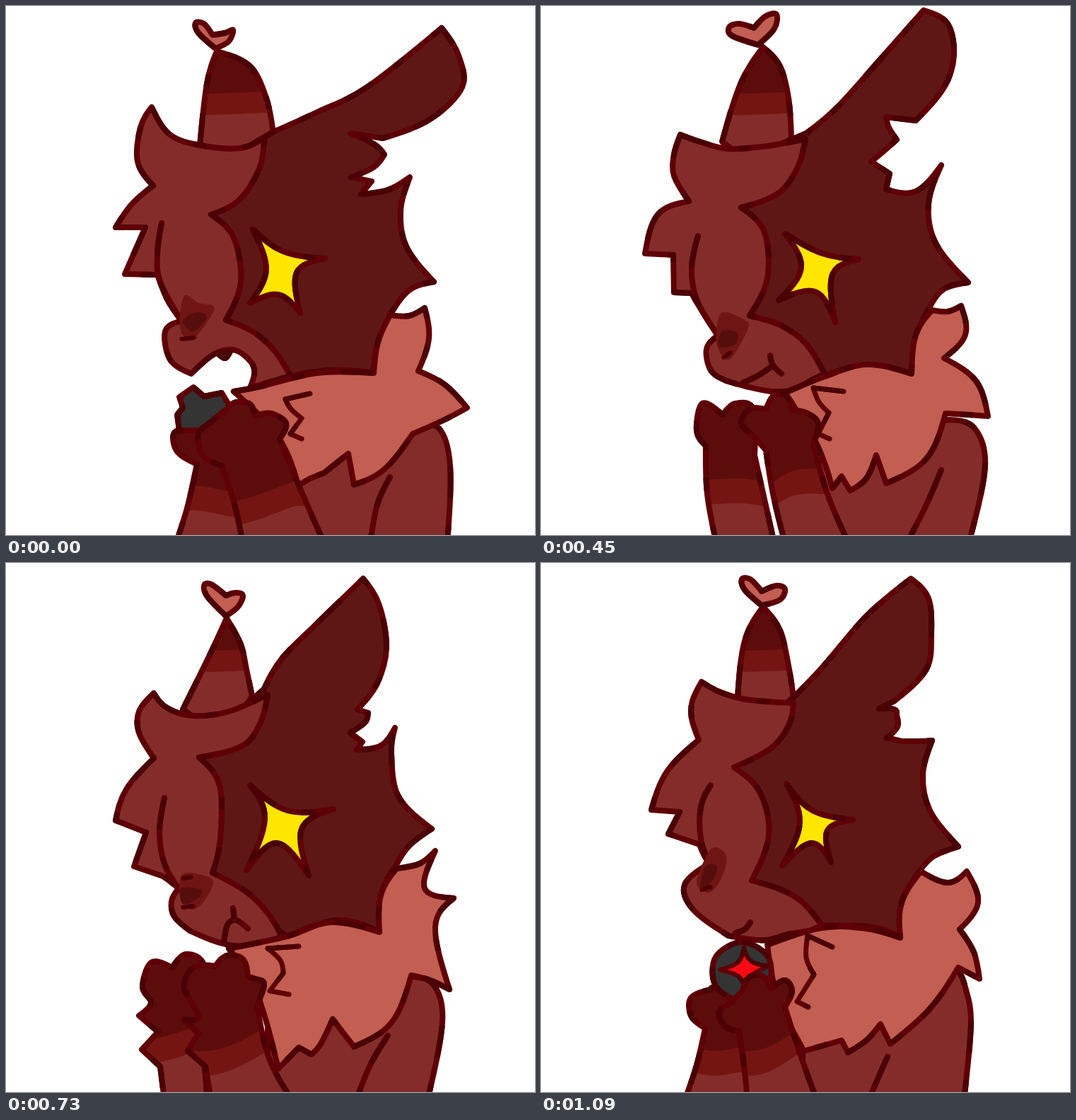
Recreate the animation shown at these times as an HTML page with a canvas. Size 748 by 748 pixels, loop 1.45 s.

```html
<!DOCTYPE html>
<html>
<head>
<meta charset="utf-8">
<style>
html, body { margin: 0; width: 100%; height: 100%; overflow: hidden; background: #fff }
canvas { display: block }
</style>
</head>
<body>
<canvas id="stage" width="748" height="748"></canvas>
<script>
const ctx = document.getElementById('stage').getContext('2d');
const SKIN = '#842C29', DARK = '#5C0D0B', MID = '#751512', FUR = '#C25E52', GREY = '#343434';
const LINE = '#5E0006', LINE_DARK = '#4A0004';
const LOOP = 1450;

// Start time of each drawing and the key pose it shows; halves lie between two poses.
const steps = [[0, 0], [180, .5], [270, 1], [360, 1.5], [450, 2], [550, 3], [640, 3.5],
  [730, 4], [820, 4.5], [910, 5], [1000, 5.5], [1090, 6]];

// One line per key pose, "x,y" points, "!" marks a sharp corner, "|" splits strokes, "-" is empty.
const parse = text => text.trim().split('\n').map(row => row.trim() === '-' ? [] :
  row.split('|').map(part => part.trim().split(/\s+/).map(p => {
    const [x, y] = p.split(',').map(parseFloat);
    return { x, y, sharp: p.endsWith('!') };
  })));

const layers = [];
const add = (style, text) => layers.push({ width: 8, ...style, poses: parse(text) });

// body
add({ fill: SKIN }, `
370,650! 575,595! 612,597 628,650 624,760! 370,760!
370,650! 575,590! 612,597 630,650 600,760! 370,760!
370,650! 575,585! 613,597 628,650 605,760! 370,760!
370,650! 575,588! 610,592 628,650 614,760! 370,760!
370,650! 575,585! 606,598 617,650 596,760! 370,760!
370,650! 578,582! 590,590 603,650 600,760! 370,760!
370,650! 590,575! 600,600 608,650 598,760! 370,760!`);
add({ open: true }, `
543,666! 525,705 515,760
528,672! 507,710 490,760
566,656! 545,705 517,760
553,660! 535,710 520,760
540,668! 515,710 495,760
505,700! 485,725 465,760
490,698! 478,725 463,760`);

// horn and heart
add({ fill: DARK, bands: parse('200,126 320,123 400,119'), drop: 30 }, `
274,198! 284,110 298,64! 345,85 368,130 378,180! 320,240!
267,195! 290,120 317,56! 340,85 352,130 355,186! 320,240!
256,192! 282,110 314,58! 338,85 350,130 354,186! 320,240!
265,192! 292,110 324,70! 340,90 345,130 347,190! 310,240!
250,207! 288,130 312,78! 332,115 340,150 348,188! 310,250!
260,200! 282,120 303,74! 328,105 342,150 343,190! 310,250!
278,190! 288,110 314,62! 338,95 350,145 357,190! 310,240!`);
add({ fill: FUR }, `
296,60! 272,38 268,24 280,25 292,41! 310,38 321,34 315,50
318,55! 275,46 265,36 280,32 310,35! 328,22 338,17 337,32
307,55! 270,42 266,30 280,25 301,31! 318,14 333,12 330,32
322,68! 304,42 304,25 314,28 330,50! 350,44 362,47 350,64
311,75! 285,48 280,32 290,30 311,46! 325,42 335,46 328,62
300,72! 270,55 265,43 280,40 298,50! 315,42 326,45 318,62
312,60! 288,38 284,23 296,23 312,40! 333,32 345,37 338,52`);

// dark side of the head with the ear
add({ fill: '#5E1715' }, `
340,200! 378,178! 440,150 510,115 616,31! 640,70 645,115 600,160 533,187! 487,180! 520,195 535,210! 520,228 488,242! 517,248! 502,266! 540,260 571,242! 558,290 566,340 605,390! 570,402 543,437! 525,480 520,518! 460,515 402,523! 300,450! 270,290!
340,195! 360,183! 420,150 490,90 581,15! 612,60 608,115 575,165 535,187! 478,186! 505,197 510,215! 500,232 483,237! 506,252! 497,264! 535,250 575,236! 555,290 560,335 599,385! 568,400 548,428! 527,470 522,515! 465,508 401,524! 300,450! 265,285!
340,195! 375,180! 420,142 480,75 541,6! 575,25 584,70 570,115 530,162! 488,157! 492,172 503,189! 485,205 467,220! 493,237! 488,259! 530,262 566,225! 548,280 558,335 604,391! 570,400 550,425! 532,465 524,520! 465,507 401,522! 295,450! 270,285!
340,195! 370,180! 400,140 455,70 515,4! 540,25 551,70 535,130 505,165! 472,171! 484,178 486,190! 470,215 450,229! 480,243! 492,265! 535,258 568,226! 555,270 562,330 600,382! 570,400 550,430! 535,465 524,518! 465,505 390,518! 292,455! 268,278!
340,200! 365,178! 390,135 440,85 505,22! 528,60 538,120 525,170 497,207! 512,212! 510,222 505,228! 495,235 487,240! 504,253! 496,264! 530,258 550,233! 545,270 555,330 602,376! 570,400 550,430! 530,470 528,522! 470,505 397,528! 290,450! 265,277!
340,200! 352,188! 395,155 450,95 547,9! 558,50 552,120 548,175 515,205! 482,208! 500,212 505,220! 500,235 478,240! 500,255! 503,255! 525,256 547,248! 535,290 545,335 590,383! 560,410 550,435! 530,475 530,520! 470,512 392,520! 290,447! 262,293!
340,205! 362,185! 400,145 460,75 523,22! 548,50 552,100 545,150 500,195! 478,206! 500,207 503,215! 504,232 489,247! 510,252! 515,252! 535,252 553,251! 540,300 550,350 590,401! 555,415 535,436! 510,480 508,530! 470,515 397,512! 292,452! 262,288!`);

// hair and face
add({ fill: SKIN }, `
206,143! 232,182 275,197 330,201 365,186! 358,230 330,274 290,295! 322,328 332,390 311,444! 350,461 380,488 402,523! 345,540! 350,510 325,487 295,492 262,520! 232,500 225,460 248,445! 228,415 214,380! 168,379! 197,313! 155,313! 178,280 208,254! 186,220 190,172
184,182! 215,190 262,196 320,195 374,188! 362,230 330,268 277,281! 312,315 320,380 304,440! 345,449 380,478 401,522! 365,534! 340,530 315,540 290,545 265,540! 245,520 237,492 248,475! 234,440 221,395! 177,401! 181,356! 146,351! 160,305 196,267! 178,235 178,205
197,182! 225,192 265,202 320,198 374,188! 362,230 335,265 283,285! 316,320 320,385 295,438! 340,452 375,478 401,520! 380,530! 355,543 325,545 290,538 262,530! 240,515 234,485 250,466! 228,432 213,406! 188,405! 187,352! 147,350! 165,295 209,276! 188,240 188,210
206,175! 235,190 270,193 310,193 372,186! 360,225 335,260 280,276! 312,320 318,390 294,445! 335,460 365,485 390,518! 370,528! 345,542 315,546 285,540 255,525! 232,505 232,485 247,470! 222,440 210,402! 178,407! 190,355! 155,354! 175,300 226,277! 198,245 194,215
209,184! 228,205 265,216 315,210 370,186! 360,225 335,258 273,275! 302,315 303,390 292,438! 340,465 370,495 390,528! 375,535! 350,541 320,541 290,533 260,520! 238,500 234,478 244,460! 232,450 222,443! 181,429! 198,381! 155,364! 170,320 209,276! 188,240 188,210
219,178! 240,200 275,208 320,203 368,187! 350,235 320,275 270,295! 308,330 314,390 296,444! 340,458 380,480 392,520! 335,543! 325,510 305,480 275,487 237,521! 213,498 206,460 240,453! 225,430 213,402! 175,398! 184,353! 145,349! 170,290 215,255! 200,230 205,203
227,168! 252,182 285,192 320,196 357,198! 350,230 325,262 273,289! 310,325 322,385 298,449! 340,462 370,480 397,512! 380,520! 350,525 320,533 295,532 265,527! 215,490 203,455 238,425! 230,412 224,398! 180,383! 196,352! 156,349! 178,295 223,250! 213,220 214,195`);
add({ open: true }, `
220,307! 214,350 218,390 248,445
222,323! 220,370 226,415 248,475
222,325! 213,370 220,415 250,466
221,333! 211,375 216,420 247,470
224,332! 217,380 224,425 244,460
239,307! 218,340 217,400 240,453
240,314! 226,345 226,390 238,425`);

// nose
add({ fill: '#6F1513', width: 0 }, `
252,410 272,420 294,425 285,446 262,472 246,455
255,434 288,444 293,455 280,485 265,500 248,480
255,434 288,444 293,455 275,490 262,500 248,475
255,434 284,444 290,455 275,480 262,492 250,470
250,440 280,442 293,452 280,478 262,490 246,470
228,415 250,420 262,425 252,450 238,475 224,462
240,405 258,408 262,425 250,455 235,466 220,450`);
add({ fill: '#560E0C', width: 0 }, `
250,445 270,433 284,440 265,460
258,460 278,460 276,475 258,492
256,460 277,462 275,478 252,482
255,460 277,462 275,478 252,484
248,460 277,462 270,475 250,482
232,430 252,430 250,445 232,452
232,430 248,428 245,445 225,465`);
add({ open: true, width: 6 }, `
248,471! 266,469!
256,499! 267,496!
258,497! 268,490!
250,492! 262,490!
250,487! 265,485! | 250,446! 262,444!
224,475! 234,473!
228,462! 240,458!`);

// tooth and mouth
add({ fill: GREY, width: 6 }, `
299,492! 318,489! 310,499
-
-
-
-
275,489! 289,487! 284,499
-`);
add({ open: true }, `
-
-
285,533! 308,522 327,509! | 324,494! 328,508 340,520
300,535! 318,524 330,513! | 315,498! 320,508 332,514
308,537! 313,512 325,505 342,517 | 321,488! 323,503!
-
275,523! 288,518 296,508!`);

// eye
add({ fill: '#FFE600' }, `
348,315! 392,347 451,357! 411,377 416,434! 385,408 345,420! 368,372
348,312! 400,350 453,359! 415,382 418,440! 385,405 337,418! 364,372
345,322! 398,350 449,358! 412,380 416,447! 388,404 336,416! 368,370
345,322! 398,354 446,356! 410,378 420,444! 385,396 338,420! 368,370
345,314! 398,350 463,348! 418,376 428,442! 383,396 340,435! 366,362
341,316! 385,350 447,362! 408,375 426,434! 383,388 338,425! 366,357
347,312! 384,350 441,363! 405,378 410,423! 382,396 341,428! 366,367`);

// neck fur
add({ fill: FUR }, `
322,545! 360,538 440,519 520,519! 526,475 543,437! 570,438 592,427! 598,470 583,516! 620,535 652,568! 620,585 575,605! 535,655 492,677! 484,633! 465,648 450,660! 430,668! 413,678! 385,610
365,535! 401,524 460,510 522,515! 530,465 548,432! 575,434 598,424! 602,465 580,507! 625,530 648,583! 610,584 577,590! 545,645 496,662! 480,632! 462,655 448,665! 435,672! 420,680! 395,600
345,547! 401,524 460,507 524,520! 530,465 553,430! 575,432 594,424! 600,465 570,498! 615,530 632,580! 605,578 572,576! 545,640 488,675! 474,635! 460,668 437,685! 425,665! 412,682! 390,620
355,545! 400,520 460,506 524,518! 535,465 552,432! 580,430 600,420! 600,460 572,494! 615,530 635,592! 605,588 573,585! 540,650 485,685! 472,642! 450,680 425,695! 412,675! 400,693! 385,630
315,545! 397,528 460,508 528,522! 530,470 552,432! 585,425 607,407! 592,460 633,474! 607,515 627,603! 600,590 573,583! 545,650 492,684! 462,645! 445,680 432,695! 414,685! 385,715! 355,610
330,545! 392,522 460,516 530,522! 530,480 552,435! 585,440 616,430! 615,470 598,505! 628,545 632,592! 605,585 578,582! 548,650 496,685! 476,645! 460,675 428,698! 418,660! 380,700! 345,620
320,540! 397,516 460,517 508,530! 510,480 537,436! 575,452 602,436! 618,480 592,518! 612,550 620,588! 605,580 590,572! 550,630 494,680! 480,652! 460,675 434,692! 425,675! 372,690! 335,615`);
add({ open: true, width: 7 }, `
430,548! 395,556! 403,570 418,583! 402,605! 418,612!
428,548! 395,540! 405,560 420,578! 400,597! 425,622!
428,545! 385,540! 393,560 407,575! 392,605! 408,612!
420,543! 378,535! 388,558 404,575! 395,617! 412,618!
414,542! 370,545! 388,562 392,580! 373,605! 400,610!
417,545! 377,540! 377,562 390,580! 366,617! 400,620!
412,543! 377,527! 375,558 386,582! 362,620! 378,628!`);

// back arm
add({ fill: DARK, drop: 35, bands: parse(`
240,688 265,678 330,690
240,690 275,683 330,700
235,670 280,668 312,672
235,670 270,668 305,672
200,675 240,665 270,655
210,680 240,690 275,685
215,685 245,690 280,685`) }, `
335,760! 320,600! 300,592 275,592 255,598! 237,605 242,630 270,648! 256,710 240,760!
336,760! 335,590! 315,510 292,510 278,545! 253,555 252,580 268,593! 250,680 228,760!
330,760! 302,635! 300,570 275,562 257,578! 228,562 220,600 233,622! 235,690 248,760!
332,760! 298,640! 290,578 265,560 245,575! 215,585 210,620 232,632! 238,690 250,760!
285,760! 275,640! 280,570 255,553 235,572! 205,565 193,600 205,622 188,640! 215,663! 192,688! 218,712! 224,760!
300,760! 275,620! 255,578 225,575 214,608! 196,625 203,645 215,652! 212,710 210,760!
295,760! 275,630! 268,605 245,600 240,603! 212,615 212,640 232,658! 220,710 203,760!`);

// ball with its star
add({ fill: GREY }, `
265,539! 280,552! 305,547! 316,565! 300,600! 245,600! 242,578! 250,568! 245,553!
-
-
-
-
284,527 320,547 320,588 284,609 248,588 248,547
284,536 321,557 321,598 284,619 247,598 247,557`);
add({ fill: '#FF0A14', width: 6 }, `
-
-
-
-
285,538! 295,558 325,567! 300,577 285,586! 275,577 254,565! 277,558
287,544! 297,563 321,570! 300,581 285,593! 277,583 253,575! 278,565`);
layers.at(-1).poses.splice(4, 0, []);

// front arm
add({ fill: DARK, drop: 35, bands: parse(`
320,702 360,690 408,672
330,700 370,680 420,678
320,680 355,658 395,655
325,678 350,663 385,655
260,690 310,685 370,655
275,690 330,680 370,655
280,690 320,685 370,655`) }, `
450,760! 415,680 387,612! 396,590 375,576 352,580! 345,563 325,560 312,570! 290,588 272,605 278,635 305,650! 322,700 335,760!
445,760! 418,690 390,605! 402,572 390,545 362,538! 358,515 335,508 322,550! 295,556 280,575 290,600 322,607! 328,680 336,760!
435,760! 405,690 385,620! 392,590 375,575 355,572! 348,552 330,550 318,570! 295,570 283,590 300,608 318,628! 328,690 345,760!
425,760! 398,690 375,635! 388,600 380,580 352,575! 345,553 320,553 306,578! 285,585 276,605 290,622 308,635! 322,690 338,760!
405,760! 372,700 355,625! 365,595 352,588 342,585! 335,560 312,555 296,570! 265,572 252,600 272,640 252,646! 272,665! 257,690! 282,712! 290,760!
395,760! 370,700 343,622! 350,590 335,572 315,578! 298,568 280,572 268,590! 258,595 252,610 245,640 268,648! 285,700 300,760!
390,760! 365,690 345,628! 355,605 345,590 325,602! 315,585 295,585 285,605! 270,620 252,635 260,655 280,662! 287,710 292,760!`);

// Blend two neighbouring poses; shapes that do not correspond are held.
function blend(poses, at) {
  const i = Math.floor(at), k = at - i;
  const a = poses[i] || poses[0], b = poses[i + 1] || a;
  if (!k) return a;
  return a.map((part, n) => b[n]?.length !== part.length ? part : part.map((p, j) => ({
    x: p.x + (b[n][j].x - p.x) * k,
    y: p.y + (b[n][j].y - p.y) * k,
    sharp: p.sharp
  })));
}

// Smooth curve through the points, breaking its tangent at sharp corners.
function curve(pts, open) {
  const path = new Path2D(), n = pts.length, last = open ? n - 1 : n;
  const get = i => pts[(i + n) % n];
  const isEnd = i => get(i).sharp || open && (i === 0 || i === n - 1);
  const handle = (p, from, to) => ({ x: p.x + (to.x - from.x) / 6, y: p.y + (to.y - from.y) / 6 });
  const mid = (p, q) => ({ x: (p.x + q.x) / 2, y: (p.y + q.y) / 2 });
  path.moveTo(pts[0].x, pts[0].y);
  for (let i = 0; i < last; i++) {
    const p = get(i), q = get(i + 1), pEnd = isEnd(i), qEnd = isEnd(i + 1);
    let c = handle(p, get(i - 1), q), d = handle(q, get(i + 2), p);
    if (pEnd && qEnd) { c = p; d = q; }
    else if (pEnd) c = mid(p, d);
    else if (qEnd) d = mid(q, c);
    path.bezierCurveTo(c.x, c.y, d.x, d.y, q.x, q.y);
  }
  if (!open) path.closePath();
  return path;
}

function fillBands(path, [band], drop) {
  const first = band[0], end = band.at(-1);
  const edge = (x, y) => ({ x, y, sharp: true });
  const area = curve([edge(-20, first.y), { ...first, sharp: true }, ...band.slice(1, -1),
    { ...end, sharp: true }, edge(770, end.y), edge(770, 800), edge(-20, 800)]);
  ctx.save();
  ctx.clip(path);
  ctx.fillStyle = MID;
  ctx.fill(area);
  ctx.translate(0, drop);
  ctx.fillStyle = SKIN;
  ctx.fill(area);
  ctx.restore();
}

function ink(path, width) {
  ctx.lineWidth = width;
  ctx.strokeStyle = LINE;
  ctx.stroke(path);
  ctx.lineCap = 'butt';
  ctx.setLineDash([46, 38, 18, 52]);
  ctx.strokeStyle = LINE_DARK;
  ctx.stroke(path);
  ctx.setLineDash([]);
  ctx.lineCap = 'round';
}

function draw(at) {
  ctx.fillStyle = '#fff';
  ctx.fillRect(0, 0, 748, 748);
  ctx.lineJoin = ctx.lineCap = 'round';
  for (const { fill, width, open, bands, drop, poses } of layers) {
    for (const pts of blend(poses, at)) {
      const path = curve(pts, open);
      if (fill) {
        ctx.fillStyle = fill;
        ctx.fill(path);
      }
      if (bands) fillBands(path, blend(bands, at), drop);
      if (width) ink(path, width);
    }
  }
}

function tick() {
  const t = performance.now() % LOOP;
  draw(steps.findLast(([start]) => start <= t)[1]);
  requestAnimationFrame(tick);
}
tick();
</script>
</body>
</html>
```
